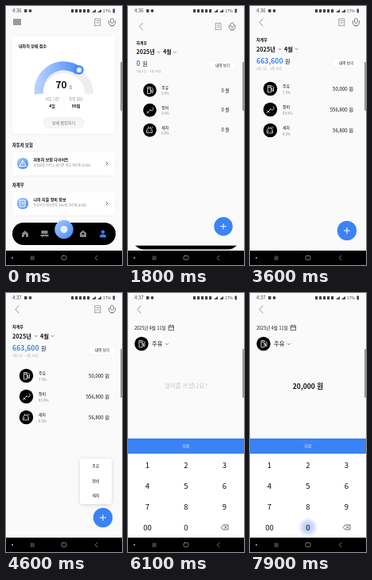
These frames come from a looping animation (146x324 px, 8 s). An HTML page:

```html
<!DOCTYPE html>
<html lang="ko">
<head>
<meta charset="utf-8">
<style>
html, body { margin: 0; height: 100%; overflow: hidden; background: #fafafa; }
svg { display: block; width: 146px; height: 324px; }
text { font-family: "Noto Sans CJK KR", "Noto Sans CJK", "Noto Sans", sans-serif; white-space: pre; }
.line { fill: none; stroke-linecap: round; stroke-linejoin: round; }
</style>
</head>
<body>
<svg id="stage" viewBox="0 0 146 324"></svg>
<script>
const BLUE = '#3b82f6', INK = '#111', GRAY = '#8c8c8c', PAPER = '#fafafa', STATUS = '#444', SOFT_KEY = '#aaa';
const MID = 73, CENTER = 150;

const text = (x, y, size, str, { fill = INK, weight = 400, anchor = 'start', id = '' } = {}) =>
  `<text id="${id}" x="${x}" y="${y + size * .37}" font-size="${size}" fill="${fill}" font-weight="${weight}" text-anchor="${anchor}">${str}</text>`;
const rect = (x, y, w, h, r, fill, extra = '') =>
  `<rect x="${x}" y="${y}" width="${w}" height="${h}" rx="${r}" fill="${fill}" ${extra}/>`;
const circle = (x, y, r, fill, extra = '') => `<circle cx="${x}" cy="${y}" r="${r}" fill="${fill}" ${extra}/>`;
const line = (d, stroke = INK, width = .7) => `<path class="line" d="${d}" stroke="${stroke}" stroke-width="${width}"/>`;
const at = (x, y, body) => `<g transform="translate(${x} ${y})">${body}</g>`;
const group = (id, body) => `<g id="${id}">${body}</g>`;
const down = (x, y) => line(`M${x - 1.5} ${y - .8}l1.5 1.6 1.5-1.6`, '#555');
const back = line('M16 16l-4 4.5 4 4.5', '#666', .7);
const bold = { weight: 700 }, centered = { anchor: 'middle' };

const topIcons = at(115.5, 20.5, line('M-3.3-4.5h6.6v9l-1.6-1-1.7 1-1.7-1-1.6 1zM-1.5-2h3M-1.5 .5h3', '#777')) +
  at(133.5, 20.5, line('M-2-1v-2a2 2 0 0 1 4 0v2a2 2 0 0 1-4 0M-4-2q-1 6 4 6t4-6M-2 4.3h4', '#777', .9));

const glyphs = {
  fuel: 'M-3 4v-8h4v8zM-2-2h2M1 0h1.5v3h1.5v-5l-1.5-1.5',
  repair: 'M-4 4l4.5-4.5M.5-.5a2.2 2.2 0 1 0 3-3M-3.5 1.5l2.2 2.2',
  wash: 'M-4 3v-3l1.5-2.5h4l1.5 2.5v3zM-2.5 1h.5M1 1h.5M-2-4v.5M1-4v.5M3.5-4l-.5 1'
};
const badge = (x, y, glyph) => circle(x, y, 8.7, '#000') + at(x, y, line(glyphs[glyph], '#fff', .8));

const infoCard = (y, title, sub, mark) =>
  rect(8, y, 129, 29, 3, '#fff', 'filter="url(#soft)"') + rect(14, y + 7, 14, 14, 6, 'url(#pale)') +
  at(21, y + 14, line(mark, '#fff', 1)) + text(34.5, y + 9.5, 5, title, bold) +
  text(34.5, y + 17, 4, sub, { fill: GRAY }) +
  circle(127, y + 14, 4, '#f6f7f8') + line(`M126 ${y + 12}l2 2-2 2`, '#444');

const home = rect(0, 0, 146, 306, 0, PAPER) + rect(9, 16, 10, 8, 0, '#999') + topIcons +
  rect(8, 38, 129, 122, 3, '#fff', 'filter="url(#soft)"') +
  text(16, 50, 5, '내차의 상태 점수', bold) +
  '<path d="M41.5 110A31.5 31.5 0 1 1 104.5 110" fill="none" stroke="#eee" stroke-width="11"/>' +
  '<path d="M41.5 110A31.5 31.5 0 0 1 91.500 81" fill="none" stroke="url(#gauge)" stroke-width="11"/>' +
  circle(92, 80, 4.8, '#a9c8fb', `stroke="${BLUE}" stroke-width="2"`) + circle(92, 80, 2.2, '#fff') +
  text(62.5, 99, 12, '70', bold) + text(79, 101, 5, '점', { fill: GRAY }) +
  text(58, 116, 4.6, '가입 기간', { fill: GRAY, ...centered }) + text(88, 116, 4.6, '주행 점수', { fill: GRAY, ...centered }) +
  text(58, 125, 5, '4일', { ...bold, ...centered }) + text(88, 125, 5, '99점', { ...bold, ...centered }) +
  line('M73 114v13', '#eee', .5) +
  rect(47, 139, 51, 14, 7, '#f5f5f5', 'stroke="#e9e9e9" stroke-width=".5"') +
  text(72.5, 146, 5, '상세 확인하기', { fill: '#666', ...centered }) +
  text(8, 174, 5.3, '자동차 보험', bold) +
  infoCard(183, '자동차 보험 다이어트', '보험료를 아끼고 싶다면 지금 확인해 보세요', 'M-4 3l4-7 4 7zM0-1v2') +
  text(8, 224, 5.3, '차계부', bold) +
  infoCard(233, '나의 지출 정비 정보', '주유부터 정비까지 한눈에 관리해 보세요', 'M-3-4h6v8h-6zM-1.2-1h2.4M-1.2 1h2.4') +
  rect(8, 271, 130, 28, 14, '#000') +
  at(24, 285, '<path d="M-4-.5L0-4 4-.5V4H1V1H-1V4H-4z" fill="#888"/>') +
  at(48.5, 285, '<path d="M-4-4H4V0H-4zM-5 1H5V3H3V4.500H2V3H-2V4.500H-3V3H-5z" fill="#888"/>') +
  at(97, 285, '<path d="M-4-1L0-4.500 4-1V4H-4z" fill="#888"/>' + circle(0, 0, 1.3, '#000')) +
  at(122, 285, circle(0, -2.4, 2.2, BLUE) + `<path d="M-4 4.500V3Q-4 .5 0 .5T4 3V4.500z" fill="${BLUE}"/>`) +
  circle(73, 279.5, 11.7, 'url(#pale)') + circle(73, 279.5, 4.5, '#fff', 'opacity=".8"');

const items = [
  ['주유', 'fuel', '50,000', '7.5%'],
  ['정비', 'repair', '556,800', '83.9%'],
  ['세차', 'wash', '56,800', '8.6%']
];
const itemRow = ([name, glyph], i) => {
  const y = 103.5 + i * 26;
  return badge(25.5, y, glyph) + text(41, y - 3.5, 5, name, { weight: 500 }) +
    text(41, y + 4.5, 4.4, '', { fill: GRAY, id: 'share' + i }) +
    text(130, y, 6.1, '', { anchor: 'end', weight: 500, id: 'cost' + i });
};
const menu = rect(93, 207, 40, 57, 4, '#fff', 'filter="url(#shadow)"') +
  items.map(([name], i) => text(113, 216.5 + i * 18.5, 4.8, name, { weight: 500, ...centered })).join('');

const ledger = rect(0, 0, 146, 306, 0, PAPER) + back + topIcons +
  text(8, 42, 5, '차계부', bold) +
  text(8, 54, 7.3, '2025년', bold) + down(37.5, 54) + text(43, 54, 7.3, '4월', bold) + down(58.5, 54) +
  text(8, 69, 8.7, '', { fill: BLUE, weight: 700, id: 'total' }) + text(16, 69, 7, '원', { weight: 500, id: 'unit' }) +
  text(8, 79, 4, '4월 1일 ~ 4월 30일', { fill: '#aaa' }) +
  rect(104, 66, 34, 10.5, 5, '#fff', 'filter="url(#soft)"') + text(121, 71.2, 4.7, '내역 보기', { weight: 500, ...centered }) +
  items.map(itemRow).join('') + group('menu', menu) +
  circle(122, 281, 12.2, BLUE) + line('M118.500 281h7M122 277.500v7', '#fff', 1);

const keys = ['1', '2', '3', '4', '5', '6', '7', '8', '9', '00', '0'];
const keyPos = k => {
  const i = keys.indexOf(k);
  return [24.5 + i % 3 * 48.5, 215 + (i / 3 | 0) * 26];
};
const entry = rect(0, 0, 146, 306, 0, PAPER) + back +
  text(8, 43.5, 5.5, '2025년 4월 11일', { weight: 500 }) +
  line('M51.500 41h6v5.500h-6zM51.500 43h6M53 40v1.500M56 40v1.500', '#333') +
  badge(17, 63.5, 'fuel') + text(30, 63.5, 7.4, '주유') + down(49, 64) +
  text(73, 116.5, 7.5, '얼마를 쓰셨나요?', { fill: '#c8c8c8', id: 'hint', ...centered }) +
  text(73, 116.5, 8.6, '', { ...bold, ...centered, id: 'amount' }) +
  rect(0, 201, 146, 105, 0, '#fff') + rect(0, 182, 146, 19, 0, BLUE) +
  text(73, 191.5, 4.8, '다음', { fill: '#fff', weight: 500, ...centered }) +
  circle(73, 293, 12, 'url(#touch)', 'id="ripple"') +
  keys.map(k => text(...keyPos(k), 9.5, k, centered)).join('') +
  line('M117.500 293l2.500-3h6v6h-6zM121.500 291.700l2.600 2.600M124.100 291.700l-2.600 2.600', '#333');

const system = text(8, 6, 6, '4:36', { fill: STATUS, id: 'clock' }) +
  rect(23, 4, 3.5, 4, .8, STATUS) + circle(30.5, 6, 1.9, STATUS) +
  [82, 87, 92, 97, 102].map(x => rect(x, 4, 3.2, 4.2, .8, STATUS)).join('') +
  `<path d="M108 8l5-4v4zM115 8l5-4v4z" fill="${STATUS}"/>` +
  text(122, 6, 5, '17%', { fill: STATUS }) + rect(134.5, 3.5, 2.5, 5, .7, STATUS) +
  rect(144, 70, 2.5, 61, 1, '#9a9a9a') +
  rect(0, 306, 146, 18, 0, '#000') + circle(8, 315, 1, SOFT_KEY) +
  line('M31.500 313v4.500M33.200 313v4.500M34.900 313v4.500', SOFT_KEY, .6) +
  line('M71.500 312.500h3q1.500 0 1.500 1.500v2q0 1.500-1.500 1.500h-3q-1.500 0-1.500-1.500v-2q0-1.500 1.500-1.500z', SOFT_KEY) +
  line('M115 312.300l-2.800 2.800 2.800 2.800', SOFT_KEY);

const stops = list => list.map(([o, c, a = 1]) => `<stop offset="${o}" stop-color="${c}" stop-opacity="${a}"/>`).join('');
const defs = `<defs>
  <linearGradient id="gauge">${stops([[0, '#b3d0ff'], [1, '#4b8df8']])}</linearGradient>
  <linearGradient id="pale" x2="1" y2="1">${stops([[0, '#a5c8ff'], [1, '#4a8cf7']])}</linearGradient>
  <radialGradient id="touch">${stops([[0, '#7fa8f5', .75], [.55, '#9dbdf8', .55], [1, '#c5d8fb', 0]])}</radialGradient>
  <filter id="soft"><feDropShadow dx="0" dy=".5" stdDeviation="1" flood-opacity=".05"/></filter>
  <filter id="shadow" x="-30%" y="-30%" width="160%" height="160%"><feDropShadow dx="0" dy="1" stdDeviation="2.5" flood-opacity=".15"/></filter>
</defs>`;

const $ = id => document.getElementById(id);
$('stage').innerHTML = defs + group('home', home) + group('ledger', ledger) + group('entry', entry) + group('system', system);

const LOOP = 8000, ZOOM = 350;
const OPEN_LEDGER = 1690, LOADED = 3200, OPEN_MENU = 3740, CLOSE_MENU = 5050, OPEN_ENTRY = 5240;
const presses = [[6750, '2', '2'], [7050, '0', '20'], [7250, '0', '200'], [7450, '0', '2,000'], [7690, '0', '20,000']];

const ramp = (t, from, length) => Math.min(1, Math.max(0, (t - from) / length));
const easeOut = (p, power = 2) => 1 - (1 - p) ** power;
const zoomCurve = p => p < .166 ? .4 * (p / .166) ** 2 : .4 + .6 * easeOut((p - .166) / .834, 4);
const scaleAbout = (x, y, s) => `translate(${x} ${y}) scale(${s}) translate(${-x} ${-y})`;
const show = (id, visible) => { $(id).style.display = visible ? '' : 'none'; };

// The incoming screen grows and fades in while the one below swells slightly.
function zoom(below, above, p) {
  const k = zoomCurve(p);
  show(below, p < 1);
  show(above, p > 0);
  $(below).setAttribute('transform', scaleAbout(MID, CENTER, 1 + .05 * k));
  $(above).setAttribute('transform', scaleAbout(MID, CENTER, .85 + .15 * k));
  $(above).setAttribute('opacity', ramp(p, .125, .125));
}

function render(t) {
  const toLedger = ramp(t, OPEN_LEDGER, ZOOM), toEntry = ramp(t, OPEN_ENTRY, ZOOM);
  zoom('home', 'ledger', toLedger);
  if (toEntry > 0) zoom('ledger', 'entry', toEntry);
  else show('entry', false);

  const loaded = t >= LOADED;
  $('total').textContent = loaded ? '663,600' : '0';
  $('unit').setAttribute('x', loaded ? 44 : 16);
  items.forEach(([, , cost, share], i) => {
    $('cost' + i).textContent = (loaded ? cost : '0') + ' 원';
    $('share' + i).textContent = loaded ? share : '0.0%';
  });

  const opened = easeOut(ramp(t, OPEN_MENU, 350));
  $('menu').setAttribute('opacity', opened * (1 - ramp(t, CLOSE_MENU, 150)));
  $('menu').setAttribute('transform', scaleAbout(133, 264, .6 + .4 * opened));

  const press = presses.filter(([start]) => t >= start).pop();
  show('hint', !press);
  show('ripple', press);
  $('amount').textContent = press ? press[2] + ' 원' : '';
  if (press) {
    const [start, key] = press, [x, y] = keyPos(key), ripple = $('ripple');
    ripple.setAttribute('cx', x);
    ripple.setAttribute('cy', y);
    ripple.setAttribute('r', 6 + 7 * easeOut(ramp(t, start, 200)));
    ripple.setAttribute('opacity', 1 - ramp(t, start + 200, 150));
  }
  $('clock').textContent = t < 3800 ? '4:36' : '4:37';
}

(function frame() {
  render(performance.now() % LOOP);
  requestAnimationFrame(frame);
})();
</script>
</body>
</html>
```
